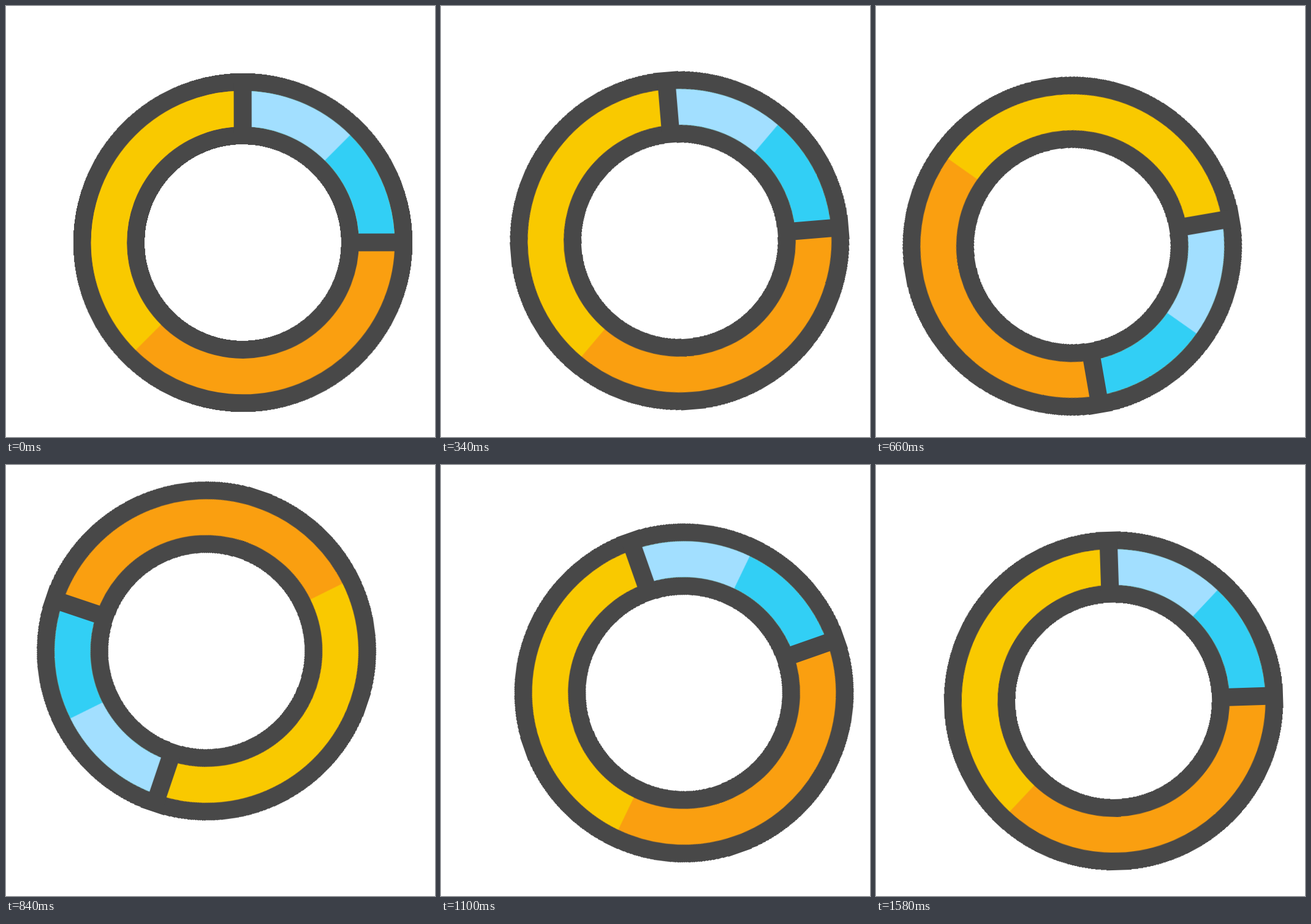
An HTML page that plays this animation: 700 px wide and 704 px high, repeating every 1600 ms.

```html
<!DOCTYPE html>
<html lang="en">
<head>
<meta charset="utf-8">
<title>Ring loader</title>
<style>
  html, body {
    margin: 0;
    width: 100%;
    height: 100%;
    overflow: hidden;
    background: #fff;
  }
  svg {
    display: block;
    width: 100%;
    height: 100%;
  }
  circle, path {
    fill: none;
    stroke-width: 58.4;
  }
  .base {
    stroke: #484848;
    stroke-width: 116.4;
    shape-rendering: crispEdges;
  }
  .gap {
    stroke: #484848;
    stroke-width: 29.2;
  }
  .orange { stroke: #fa9f10; }
  .yellow { stroke: #f9c900; stroke-dasharray: 3 5; stroke-dashoffset: -3; }
  .cyan   { stroke: #32cff5; stroke-dasharray: 2 6; stroke-dashoffset: -6; }
  .pale   { stroke: #a2dfff; stroke-dasharray: 1 7; stroke-dashoffset: -6; }

  /* The ring sits off the pivot, so it swings as it turns. */
  .ring {
    transform-origin: 350px 350px;
    animation: spin 1600ms infinite;
  }
  /* wind up, whirl past the full turn, sink back */
  @keyframes spin {
    0% {
      transform: rotate(0deg);
      animation-timing-function: cubic-bezier(.333, .667, .667, 1);
    }
    13.75% {
      transform: rotate(-9.6deg);
      animation-timing-function: cubic-bezier(.599, 0, .533, 1);
    }
    81.2% {
      transform: rotate(365deg);
      animation-timing-function: cubic-bezier(.333, 0, .667, .333);
    }
    100% {
      transform: rotate(357.2deg);
    }
  }
</style>
</head>
<body>
<svg viewBox="0 0 700 704">
  <g class="ring">
    <g transform="translate(386.5 386.5)">
      <circle class="base" r="218.6"/>
      <circle class="orange" r="218.6"/>
      <circle class="yellow" r="218.6" pathLength="8"/>
      <circle class="cyan" r="218.6" pathLength="8"/>
      <circle class="pale" r="218.6" pathLength="8"/>
      <path class="gap" d="M0-180V-260M180 0H260"/>
    </g>
  </g>
</svg>
</body>
</html>
```
